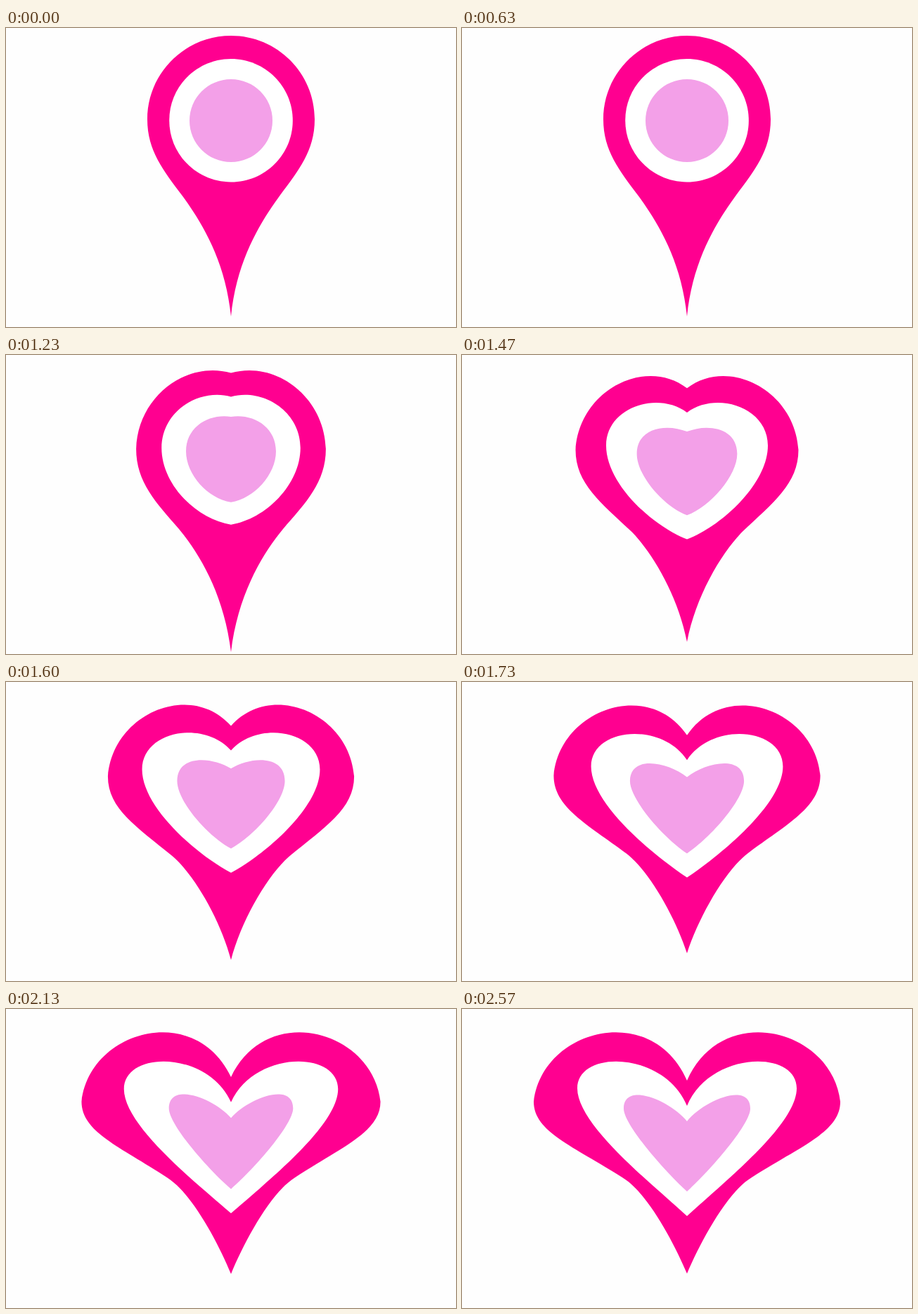
Animation of 640 by 426 pixels, one loop 3310 ms. Source, as an HTML page:

```html
<!DOCTYPE html>
<html lang="en">
<head>
<meta charset="utf-8">
<title>Pin to heart</title>
<style>
  html, body { margin: 0; width: 100%; height: 100%; overflow: hidden; background: #fefefe; }
  svg { display: block; width: 100vw; height: 100vh; }
</style>
</head>
<body>
<svg viewBox="0 0 640 426">
  <path id="outer" fill="#ff0090"/>
  <path id="ring" fill="#fff"/>
  <path id="core" fill="#f3a0e8"/>
</svg>
<script>
const LOOP = 3310, BEGIN = 630, END = 2570;
const CX = 320, KAPPA = 0.5523;

// Right half of a circle as two cubics, from top to bottom.
function halfCircle(cy, r) {
  const k = r * KAPPA;
  return [[0, cy - r], [k, cy - r], [r, cy - k], [r, cy], [r, cy + k], [k, cy + r], [0, cy + r]];
}

// Right halves, relative to the centre line: notch, side, (waist,) tip and the handles between.
const pinTail = [[119, 175], [96, 203], [70, 238], [43, 275], [8, 330], [0, 411]];
const shapes = {
  outer: {
    pin: halfCircle(130, 119).slice(0, 4).concat(pinTail),
    heart: [[0, 102], [50, -12], [206, 28], [218, 132], [218, 175], [162, 195],
            [92, 240], [58, 260], [20, 330], [0, 377]]
  },
  ring: {
    pin: halfCircle(131.7, 87.8),
    heart: [[0, 138], [32, 60], [156, 57], [156, 113], [156, 165], [52, 247], [0, 295]]
  },
  core: {
    pin: halfCircle(132, 59),
    heart: [[0, 160], [24, 130], [90, 103], [90, 142], [90, 164], [35, 228], [0, 260]]
  }
};

// Ease in and out along cubic-bezier(x1, 0, x2, 1).
function ease(u, x1 = 0.57, x2 = 0.36) {
  let lo = 0, hi = 1;
  for (let i = 0; i < 20; i++) {
    const s = (lo + hi) / 2, w = 1 - s;
    if (3 * x1 * s * w * w + 3 * x2 * s * s * w + s ** 3 < u) lo = s; else hi = s;
  }
  return lo * lo * (3 - 2 * lo);
}

// The lower parts sag early in the morph; the tip dips first and recovers.
const sag = p => 90 * p * (1 - p) ** 2;
const sagShare = y => Math.min(1, (y / 220) ** 2);
const tipDip = p => 98 * Math.sqrt(p) * (1 - p) * (0.7 - p);

function morph({ pin, heart }, p) {
  return pin.map(([x, y], i) => [
    CX + x + (heart[i][0] - x) * p,
    y + (heart[i][1] - y) * p + sagShare(y) * sag(p)
  ]);
}

function outline(half) {
  const pt = ([x, y]) => x.toFixed(2) + " " + y.toFixed(2);
  const left = half.slice(0, -1).reverse().map(([x, y]) => [2 * CX - x, y]);
  return "M" + pt(half[0]) + "C" + half.slice(1).concat(left).map(pt).join(" ") + "Z";
}

function draw(time) {
  const u = (time % LOOP - BEGIN) / (END - BEGIN);
  const p = ease(Math.min(1, Math.max(0, u)));
  for (const id in shapes) {
    const half = morph(shapes[id], p);
    if (id === "outer") half[half.length - 1][1] += tipDip(p) - sag(p);
    document.getElementById(id).setAttribute("d", outline(half));
  }
}

const start = performance.now();
function tick() {
  draw(performance.now() - start);
  requestAnimationFrame(tick);
}
tick();
</script>
</body>
</html>
```
